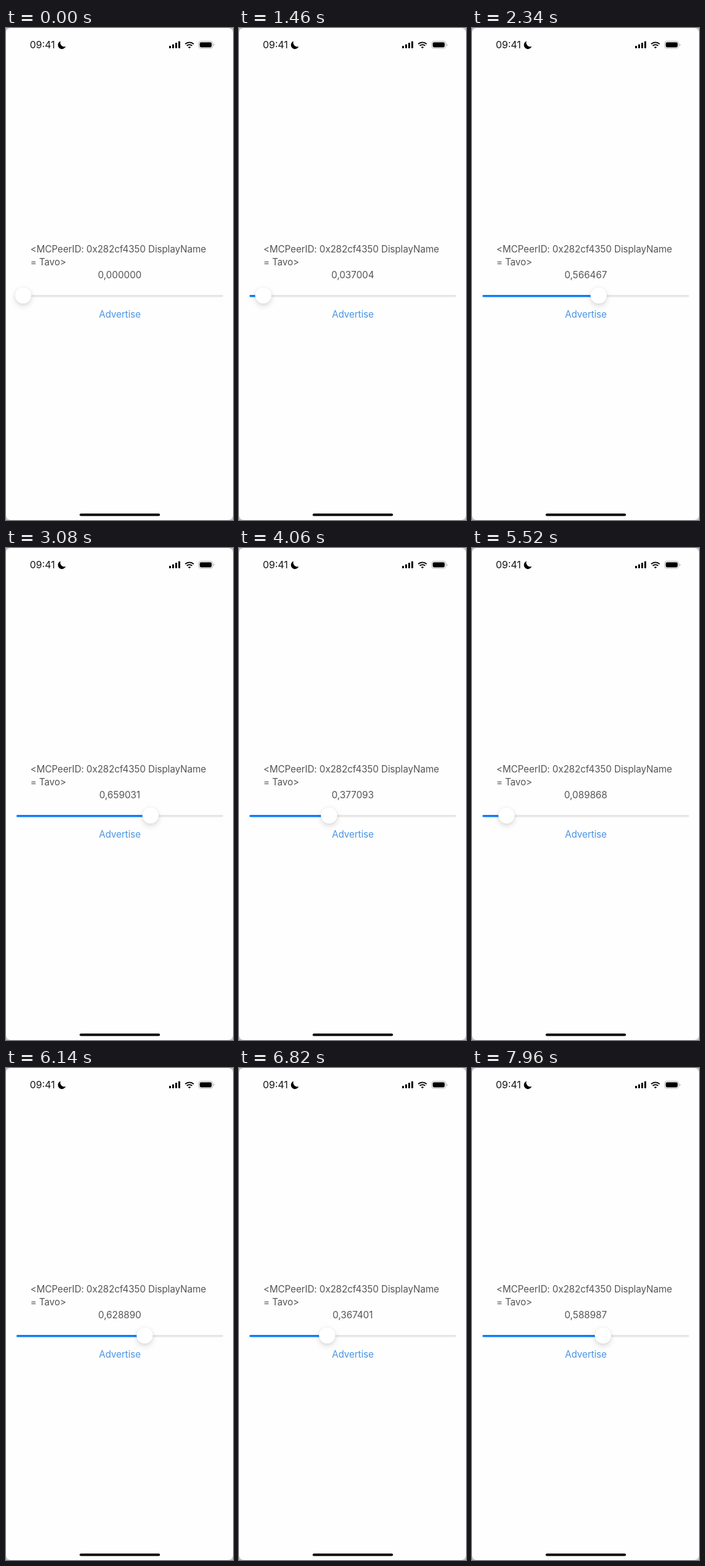
Animation of 370x800 px, one loop 8 s. Source, as an HTML page:

```html
<!DOCTYPE html>
<html lang="en">
<head>
<meta charset="utf-8">
<title>Slider</title>
<style>
  html, body { margin: 0; width: 100%; height: 100%; overflow: hidden; background: #c6c6c6; }
  svg { display: block; width: 370px; height: 800px; }
  text { font: 400 15.3px Inter, Roboto, sans-serif; letter-spacing: -.1px; fill: #555; white-space: pre; }
  .mid { text-anchor: middle; }
  .clock { font-size: 16px; letter-spacing: 0; fill: #161616; }
  .link { fill: #4a93e2; }
  #value { letter-spacing: 0; }
  #knob { filter: drop-shadow(0 4px 4px rgba(0, 0, 0, .13)) drop-shadow(0 0 1px rgba(0, 0, 0, .1)); }
</style>
</head>
<body>
<svg viewBox="0 0 370 800">
  <rect width="370" height="800" rx="8" fill="#fefefe"/>

  <text class="clock" x="38.7" y="33">09:41</text>
  <path d="M88.8 21.6 A6.5 6.5 0 1 0 97.2 30 A6.6 6.6 0 0 1 88.8 21.6Z"/>
  <g id="bars"></g>
  <g fill="none" stroke="#000" stroke-width="1.8">
    <path d="M292.1 26.2 A9.8 9.8 0 0 1 305.9 26.2"/>
    <path d="M294.6 28.9 A6.2 6.2 0 0 1 303.4 28.9"/>
  </g>
  <path d="M299 33.3 L296.8 31.2 A3.2 3.2 0 0 1 301.2 31.2Z"/>
  <rect x="314" y="21.5" width="23" height="11.6" rx="3.6" fill="none" stroke="#b4b4b4"/>
  <rect x="315.7" y="23.2" width="19.6" height="8.2" rx="2.3"/>
  <path d="M338.3 25.4 q1.5 .6 1.5 1.9 t-1.5 1.9Z" fill="#b4b4b4"/>

  <text x="39.7" y="365">&lt;MCPeerID: 0x282cf4350 DisplayName</text>
  <text x="39.7" y="386">= Tavo&gt;</text>
  <text class="mid" id="value" x="185.4" y="407">0,000000</text>

  <rect x="17" y="434" width="337" height="3.4" rx="1.7" fill="#e6e6e6"/>
  <rect id="fill" x="17" y="434" width="11" height="3.4" rx="1.7" fill="#0b7ffd"/>
  <circle id="knob" cx="28" cy="434.8" r="13.3" fill="#fff"/>

  <text class="mid link" x="185.6" y="471.3">Advertise</text>
  <rect x="120" y="789.4" width="131" height="4.2" rx="2.1"/>
</svg>
<script>
const LOOP = 8000, TICK = 20, LEFT = 28, TRAVEL = 315, SWING = .42;
const $ = id => document.getElementById(id);

// Each stop: arrival time, rest in ms, value, half swings made on the way (negative: leftwards first)
const stops = [
  { at: 0, rest: 1240, value: 0 },
  { at: 1460, rest: 300, value: .037004 },
  { at: 2820, rest: 140, value: .965 },
  { at: 3080, rest: 0, value: .659031 },
  { at: 4060, rest: 100, value: .377093, swings: -2 },
  { at: 5520, rest: 40, value: .089868, swings: -2 },
  { at: 6820, rest: 0, value: .367401, swings: 1 },
  { at: 7860, rest: 140, value: .588987, swings: -2 }
];

const clamp = v => Math.min(1, Math.max(0, v));
const ease = u => u * u * (3 - 2 * u);

function valueAt(t) {
  const i = stops.findLastIndex(s => s.at <= t);
  const from = stops[i], to = stops[i + 1];
  const left = from.at + from.rest;
  if (!to || t <= left) return from.value;
  const u = (t - left) / (to.at - left);
  const base = from.value + (to.value - from.value) * ease(u);
  return clamp(base + SWING * Math.sin(Math.PI * (to.swings || 0) * u));
}

function draw(t) {
  const v = valueAt(Math.floor(t / TICK) * TICK);
  const x = LEFT + TRAVEL * v;
  $("value").textContent = v.toFixed(6).replace(".", ",");
  $("knob").setAttribute("cx", x);
  $("fill").setAttribute("width", x - 17);
  // at zero the track end stays grey
  $("fill").setAttribute("visibility", v > 0 ? "visible" : "hidden");
}

$("bars").innerHTML = [0, 1, 2, 3].map(i => {
  const h = 4 + 2.5 * i;
  return `<rect x="${265.9 + 5 * i}" y="${33 - h}" width="3" height="${h}" rx="1"/>`;
}).join("");

const start = performance.now();
function loop(now) {
  draw(Math.max(0, now - start) % LOOP);
  requestAnimationFrame(loop);
}
draw(0);
requestAnimationFrame(loop);
</script>
</body>
</html>
```
